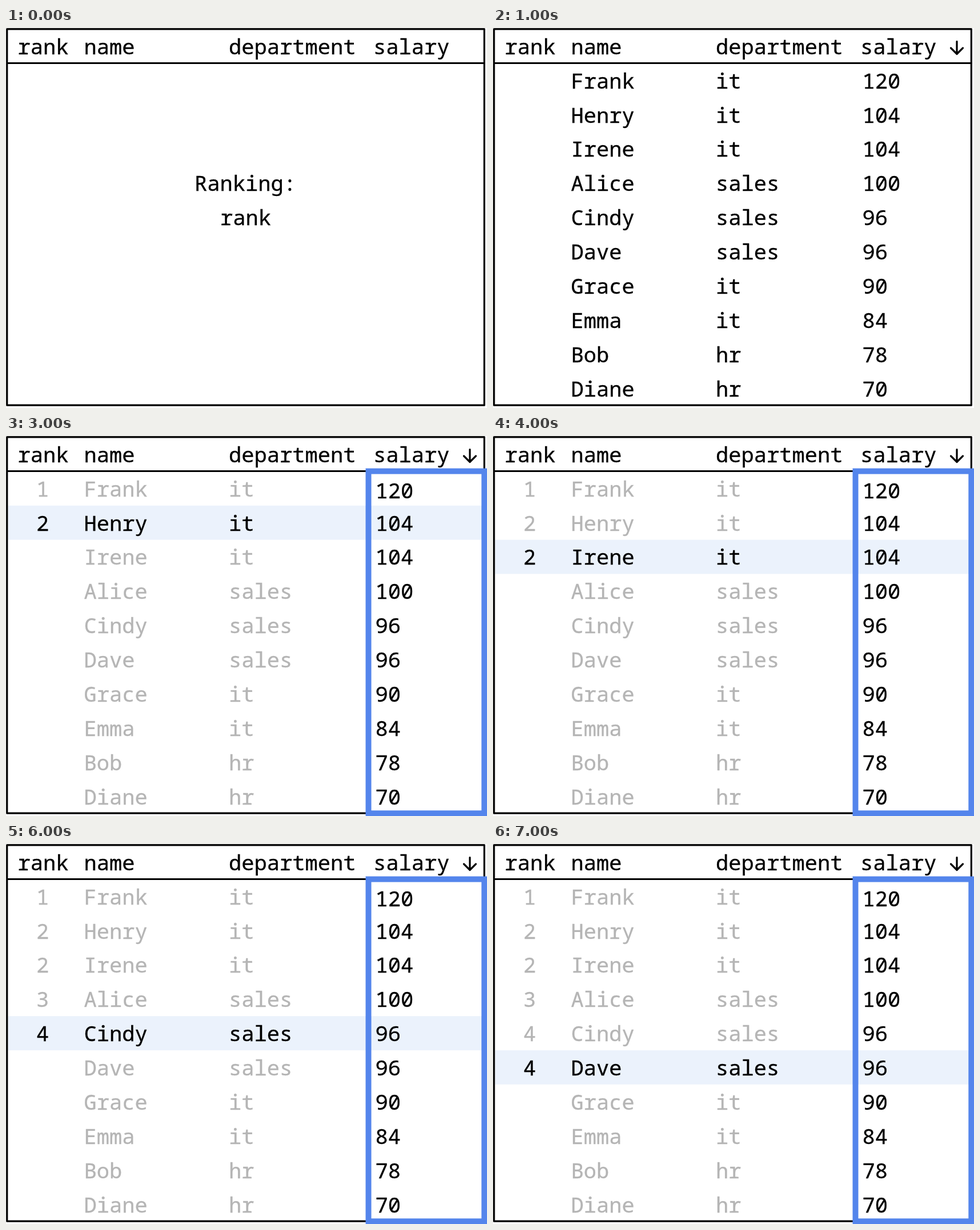
These frames come from a looping animation (842 px wide and 665 px high, 8000 ms). An HTML page:

```html
<!DOCTYPE html>
<html lang="en">
<head>
<meta charset="utf-8">
<title>Ranking: rank</title>
<style>
  html, body { margin: 0; width: 100%; height: 100%; overflow: hidden; background: #fff; }
  svg { display: block; }
  text {
    font: 37.1px "Noto Sans Mono", "DejaVu Sans Mono", monospace;
    fill: #000; stroke: #000; stroke-width: .35; white-space: pre;
  }
  .dim { fill: #b5b5b5; stroke: #b5b5b5; }
  .line { fill: none; stroke: #000; stroke-width: 3.2; stroke-linecap: round; stroke-linejoin: round; }
</style>
</head>
<body>
<svg id="stage" width="842" height="665" viewBox="0 0 842 665"></svg>
<script>
const LOOP = 8000, STEP = 1000;
const COL = { rank: 20.5, name: 136.5, department: 390, salary: 643 };
const RANK_X = 53, PAY_X = 646.5;
const ROW_H = 59.8;
const rows = [
  ["Frank", "it", 120, 1],
  ["Henry", "it", 104, 2],
  ["Irene", "it", 104, 2],
  ["Alice", "sales", 100, 3],
  ["Cindy", "sales", 96, 4],
  ["Dave", "sales", 96, 4],
  ["Grace", "it", 90, 5],
  ["Emma", "it", 84, 6],
  ["Bob", "hr", 78, 7],
  ["Diane", "hr", 70, 8],
];

const svg = document.getElementById("stage");

function add(tag, attrs, parent = svg) {
  const el = document.createElementNS("http://www.w3.org/2000/svg", tag);
  for (const key in attrs) el.setAttribute(key, attrs[key]);
  return parent.appendChild(el);
}

function label(str, x, y, parent) {
  const el = add("text", { x, y }, parent);
  el.textContent = str;
  return el;
}

function show(el, on) {
  el.style.display = on ? "" : "none";
}

const band = add("rect", { x: 4, width: 829, height: ROW_H, fill: "#ebf2fc" });
add("path", { class: "line", d: "M1.8 1.8H837.3V660.2H1.8ZM1.8 61.5H837.3" });
for (const key in COL) label(key, COL[key], 45.6);

const title = add("g", {});
label("Ranking:", 330, 285.4, title);
label("rank", 375, 345.4, title);

const table = add("g", {});
add("path", { class: "line", d: "M812 23.5V45M801.5 35L812 45.5L822.5 35" }, table);
const cells = rows.map(([name, dept, pay, rank], i) => {
  const y = 105.6 + 59.9 * i;
  return {
    rank: label(rank, RANK_X, y, table),
    name: label(name, COL.name, y, table),
    dept: label(dept, COL.department, y, table),
    pay: label(pay, PAY_X, y, table),
  };
});

const focus = add("rect", {
  x: 634.5, y: 61.6, width: 202.8, height: 598.7,
  fill: "none", stroke: "#5485ec", "stroke-width": 10,
});

// Step 0: title, step 1: sorted table, then one ranked row per step.
function draw(step) {
  const active = step - 2;
  const ranking = active >= 0;
  show(title, step === 0);
  show(table, step > 0);
  show(focus, ranking);
  show(band, ranking);
  band.setAttribute("y", 62 + ROW_H * active);
  cells.forEach((cell, i) => {
    const dim = ranking && i !== active;
    for (const key of ["rank", "name", "dept"]) cell[key].classList.toggle("dim", dim);
    show(cell.rank, i <= active);
  });
  // The first salary makes room for the focus box.
  cells[0].pay.setAttribute("y", ranking ? 108.6 : 105.6);
}

let current = 0;
function tick() {
  const step = Math.floor(performance.now() % LOOP / STEP);
  if (step !== current) draw(current = step);
  requestAnimationFrame(tick);
}
draw(current);
tick();
</script>
</body>
</html>
```
